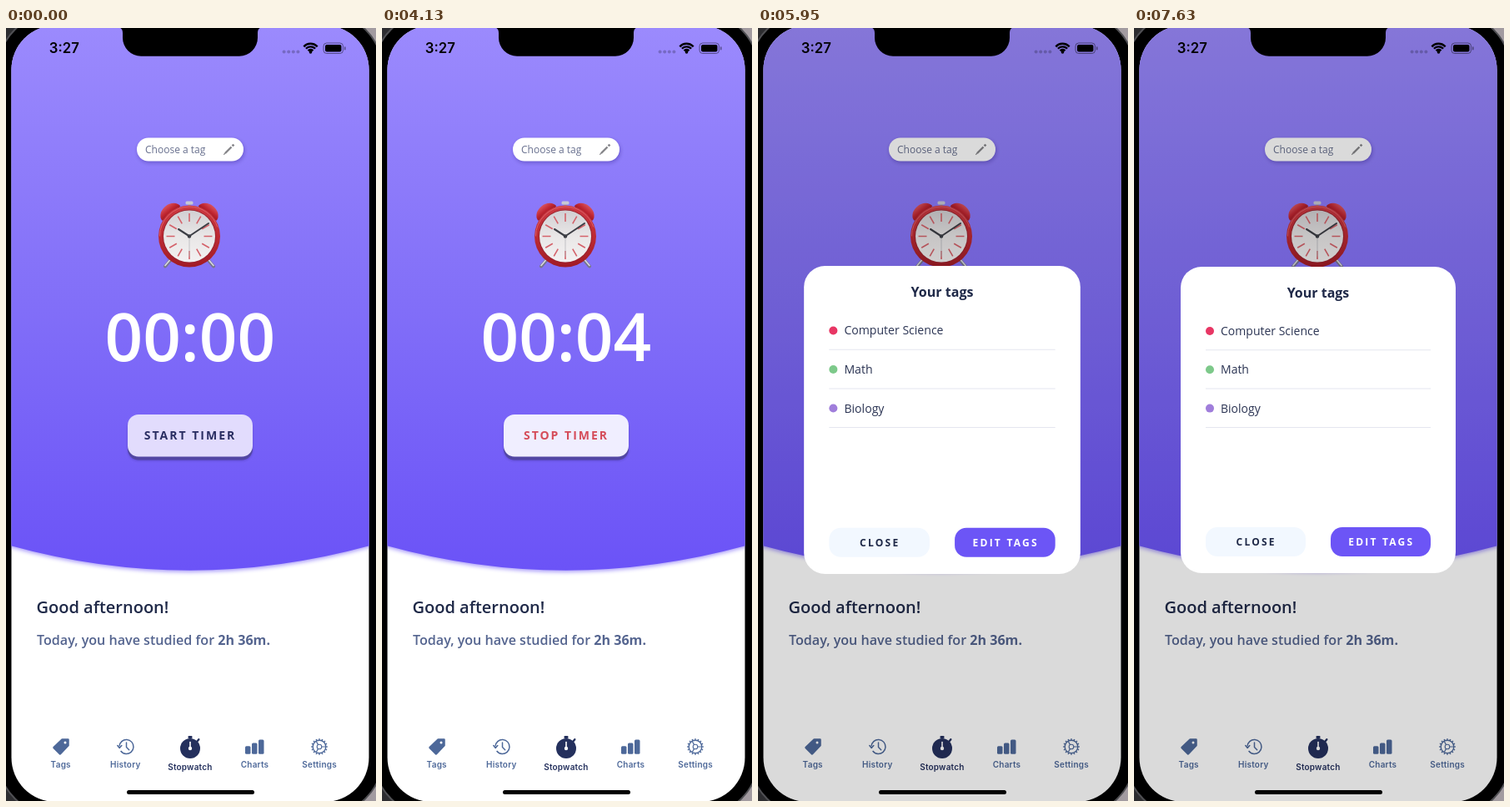
Animation, 444 px wide and 926 px high, one loop 8 s. Source, as an HTML page with a canvas:

```html
<!DOCTYPE html>
<html lang="en">
<head>
<meta charset="utf-8">
<title>Study stopwatch</title>
<style>
html, body { margin: 0; width: 100%; height: 100%; overflow: hidden; background: #000; }
canvas { display: block; width: 444px; height: 926px; }
</style>
</head>
<body>
<canvas id="stage" width="444" height="926"></canvas>
<script>
const ctx = document.getElementById('stage').getContext('2d');
const LOOP = 8000, STEP = 70;
const SANS = '"Open Sans", sans-serif', UI = 'Inter, sans-serif';
const INK = '#1f2948', SLATE = '#54648f', ICON = '#4d6899', ACTIVE = '#24305d', VIOLET = '#6c55f6';

function text(str, x, y, font, color, align = 'left', spacing = 0) {
  ctx.font = font;
  ctx.fillStyle = color;
  ctx.textAlign = align;
  ctx.letterSpacing = spacing + 'px';
  ctx.fillText(str, x, y);
}

function box(x, y, w, h, r, color) {
  ctx.beginPath();
  ctx.roundRect(x, y, w, h, r);
  ctx.fillStyle = color;
  ctx.fill();
}

function disc(x, y, r, color) {
  ctx.beginPath();
  ctx.arc(x, y, r, 0, 7);
  ctx.fillStyle = color;
  ctx.fill();
}

function line(points, width, color, cap = 'round') {
  ctx.beginPath();
  points.forEach(([x, y]) => ctx.lineTo(x, y));
  ctx.lineWidth = width;
  ctx.lineCap = cap;
  ctx.lineJoin = 'round';
  ctx.strokeStyle = color;
  ctx.stroke();
}

function ring(x, y, r, width, color, from = 0, to = Math.PI * 2) {
  ctx.beginPath();
  ctx.arc(x, y, r, from, to);
  ctx.lineWidth = width;
  ctx.lineCap = 'butt';
  ctx.strokeStyle = color;
  ctx.stroke();
}

// Evenly spaced radial strokes between two radii.
function spokes(x, y, count, inner, outer, width, color) {
  for (let i = 0; i < count; i++) {
    const a = i * Math.PI * 2 / count, c = Math.cos(a), s = Math.sin(a);
    line([[x + c * inner, y + s * inner], [x + c * outer, y + s * outer]], width, color, 'butt');
  }
}

function shadowed(color, blur, dx, dy, draw) {
  ctx.save();
  ctx.shadowColor = color;
  ctx.shadowBlur = blur;
  ctx.shadowOffsetX = dx;
  ctx.shadowOffsetY = dy;
  draw();
  ctx.restore();
}

function gradient(y0, y1, ...colors) {
  const g = ctx.createLinearGradient(0, y0, 0, y1);
  colors.forEach((c, i) => g.addColorStop(i / (colors.length - 1), c));
  return g;
}

function drawBody() {
  const outside = ctx.createLinearGradient(0, 0, 444, 0);
  outside.addColorStop(0, '#2c2c2f');
  outside.addColorStop(1, '#a39ca1');
  box(0, 0, 444, 926, 0, outside);
  box(-10, -19, 462, 963, 71, '#000');
  ctx.lineWidth = 2;
  ctx.strokeStyle = '#505054';
  ctx.stroke();
}

function drawBackdrop() {
  box(0, 0, 444, 926, 0, '#fff');
  shadowed('rgba(108, 85, 246, .6)', 5, 0, 2, () => {
    ctx.beginPath();
    ctx.moveTo(0, -10);
    ctx.lineTo(444, -10);
    ctx.lineTo(444, 618);
    ctx.quadraticCurveTo(221, 681, 0, 618.5);
    ctx.fillStyle = gradient(0, 650, '#9b8afd', '#826ff8', '#6b53f7');
    ctx.fill();
  });
}

function drawStatus() {
  text('3:27', 51.8, 30.4, '600 16.7px ' + UI, '#000');
  for (let i = 0; i < 4; i++) disc(333.6 + i * 5.6, 28.6, 2, '#7669c4');
  for (const r of [4.5, 8.6, 12.2])
    ring(365.5, 30, r - 1, r < 5 ? 3.5 : 2.4, '#000', -Math.PI * .76, -Math.PI * .24);
  disc(365.5, 29, 1.8, '#000');
  ctx.beginPath();
  ctx.roundRect(381, 18, 23.5, 12.5, 3.8);
  ctx.lineWidth = 1;
  ctx.strokeStyle = 'rgba(0, 0, 0, .45)';
  ctx.stroke();
  box(383, 20, 19.5, 8.5, 2, '#000');
  box(406, 22.2, 1.5, 4.2, 1, 'rgba(0, 0, 0, .45)');
}

function drawTagPill() {
  shadowed('rgba(50, 35, 140, .4)', 5, 1, 2, () => box(157, 131.5, 128, 28, 14, '#fff'));
  text('Choose a tag', 167, 150, '12px ' + SANS, '#69718f');
  line([[263, 150], [270.5, 142.5]], 2.4, '#858589', 'butt');
  line([[271.6, 141.4], [273.4, 139.6]], 2.6, '#858589', 'butt');
  line([[261.6, 151.4], [263, 150]], 1.2, '#858589');
}

function drawAlarmClock() {
  ctx.save();
  ctx.translate(220, 249.5);
  for (const side of [-1, 1]) {
    line([[side * 23, 29], [side * 29, 36]], 4, '#77778a');
    line([[side * 23, 28], [side * 29, 35]], 1.6, '#d9d9e2');
    line([[side * 17, -28], [side * 21, -24]], 4, '#8d2130');
    ctx.save();
    ctx.rotate(side * .67);
    ctx.beginPath();
    ctx.ellipse(0, -35, 14, 11, 0, Math.PI, 0);
    ctx.quadraticCurveTo(0, -31, -14, -35);
    ctx.fillStyle = gradient(-46, -32, '#d8525d', '#bf2530', '#8c141f');
    ctx.fill();
    ctx.restore();
  }
  line([[0, -40], [0, -33]], 3, '#9a9aa8');
  box(-4.5, -42, 9, 4, 1.5, '#c8c8d4');
  disc(0, 0, 37, gradient(-37, 37, '#cc3a42', '#bd2a33', '#a01b26'));
  ring(0, 0, 35.5, 1, '#dc6067', Math.PI, Math.PI * 1.9);
  disc(0, 0, 32, '#98232d');
  disc(0, 0, 31, gradient(-30, 30, '#d2d0d3', '#e9e7e7', '#f3f1f1'));
  spokes(0, 0, 12, 17.5, 27.5, 1.6, '#d4626a');
  line([[0, 0], [0, 24]], .8, '#b6b6bb');
  line([[1, .5], [-13, -8.5]], 2.1, '#3c3e45');
  line([[-1, .5], [23, -15.5]], 2.1, '#3c3e45');
  disc(0, 0, 2.2, '#3c3e45');
  ctx.restore();
}

function drawTimer(t) {
  const seconds = Math.max(0, Math.floor((t - 490) / 1050) + 1);
  text('00:0' + seconds, 220.8, 399, '600 80px ' + SANS, '#fff', 'center');
}

function drawTimerButton(t) {
  const running = t >= 140;
  const face = t < 140 ? '#e2dcfd' : t < 210 ? '#e9e5fe' : '#f0eeff';
  shadowed('rgba(55, 40, 140, .35)', 3, 0, 1, () => box(146, 466, 150, 51.5, 13, '#5246a3'));
  box(146, 463, 150, 50.5, 13, face);
  text(running ? 'STOP TIMER' : 'START TIMER', 221, 493.2, '700 14px ' + SANS,
    running ? '#d54c59' : '#2a2e62', 'center', 2);
}

function drawSummary() {
  text('Good afternoon!', 36.5, 700.7, '600 20px ' + SANS, INK);
  const intro = 'Today, you have studied for ';
  text(intro, 37, 739, '600 16.1px ' + SANS, SLATE);
  text('2h 36m.', 37 + ctx.measureText(intro).width, 739, '700 16.1px ' + SANS, SLATE);
}

function drawTabIcons() {
  // Tag
  ctx.beginPath();
  [[67.5, 852.5], [74.5, 852.5], [74.5, 859.5], [65, 869.5], [57.5, 862]].forEach(p => ctx.lineTo(...p));
  ctx.closePath();
  ctx.fillStyle = ctx.strokeStyle = ICON;
  ctx.lineWidth = 2.5;
  ctx.lineJoin = 'round';
  ctx.fill();
  ctx.stroke();
  disc(71, 856, 1.5, '#fff');

  // History
  ring(144.5, 861, 8.5, 1.5, ICON, -Math.PI * .98, Math.PI * .8);
  line([[133.8, 859.5], [136.2, 862.5], [138.8, 859.5]], 1.5, ICON);
  line([[144.5, 856], [144.5, 861.5], [147.7, 864.7]], 1.5, ICON);

  // Stopwatch
  disc(221, 863, 12, ACTIVE);
  box(218.5, 848, 5, 3, 1, ACTIVE);
  line([[229.5, 854.5], [231.3, 852.2]], 2.4, ACTIVE);
  line([[221, 855.5], [221, 862]], 1.6, '#fff');
  disc(221, 863, 2.2, '#fff');

  // Charts
  for (let i = 0; i < 3; i++) box(287 + i * 8, 860.3 - i * 3.9, 6.5, 9.4 + i * 3.9, 1.5, ICON);

  // Settings
  ring(376, 861, 7.8, 1.4, ICON);
  ring(376, 861, 2.8, 1.1, ICON);
  spokes(376, 861, 16, 8.3, 9.8, 1.6, ICON);
  spokes(376, 861, 3, 2.8, 7.8, 1.2, ICON);
}

function drawTabBar() {
  drawTabIcons();
  ['Tags', 'History', 'Stopwatch', 'Charts', 'Settings'].forEach((label, i) => {
    const active = i === 2;
    text(label, 65.7 + i * 77.6, active ? 888.6 : 886, '600 10px ' + UI, active ? ACTIVE : ICON, 'center', .2);
  });
}

function drawModal(scale) {
  ctx.save();
  ctx.translate(221, 469.5);
  ctx.scale(scale, scale);
  ctx.translate(-221, -469.5);
  box(56, 286, 330, 367, 25, '#fff');
  text('Your tags', 221, 322.7, '700 16px ' + SANS, INK, 'center');
  [['Computer Science', '#e83664'], ['Math', '#7dc98a'], ['Biology', '#a07edb']].forEach(([name, color], i) => {
    const y = 363 + i * 46.3;
    disc(91, y, 5, color);
    text(name, 104, y + 5, '14px ' + SANS, '#2b3453');
    box(86, y + 22.3, 270, 1, 0, '#e4e6ef');
  });
  box(86, 598, 120, 35, 14, '#f2f8ff');
  box(236, 598, 120, 35, 14, VIOLET);
  text('CLOSE', 146.6, 620, '700 12px ' + SANS, INK, 'center', 2.2);
  text('EDIT TAGS', 296.8, 620, '700 12px ' + SANS, '#fff', 'center', 2.2);
  ctx.restore();
}

// Underdamped spring from 0 to 1.
function spring(s) {
  const decay = 9.7, freq = 9.2;
  return 1 - Math.exp(-decay * s) * (Math.cos(freq * s) + decay / freq * Math.sin(freq * s));
}

function drawPopup(t) {
  if (t < 5810) return;
  const s = (t - 5686) / 1000;
  box(0, -4, 444, 934, 0, `rgba(0, 0, 0, ${.147 * Math.min(1, s / .2)})`);
  drawModal(t > 6510 ? 1 : spring(s));
}

function drawNotch() {
  ctx.beginPath();
  ctx.moveTo(133, -1);
  ctx.quadraticCurveTo(140, -1, 140, 6);
  ctx.arcTo(140, 33.7, 162, 33.7, 22);
  ctx.arcTo(302, 33.7, 302, 6, 22);
  ctx.lineTo(302, 6);
  ctx.quadraticCurveTo(302, -1, 309, -1);
  ctx.fillStyle = '#000';
  ctx.fill();
}

function drawFrame(t) {
  drawBody();
  ctx.save();
  ctx.beginPath();
  ctx.roundRect(6.5, -3, 429, 930, 53);
  ctx.clip();
  drawBackdrop();
  drawStatus();
  drawTagPill();
  drawAlarmClock();
  drawTimer(t);
  drawTimerButton(t);
  drawSummary();
  drawTabBar();
  drawPopup(t);
  box(145, 913, 153, 5, 2.5, '#000');
  ctx.restore();
  drawNotch();
}

const start = performance.now();
function tick() {
  const t = (performance.now() - start) % LOOP;
  drawFrame(Math.floor(t / STEP) * STEP);
  requestAnimationFrame(tick);
}
tick();
</script>
</body>
</html>
```
